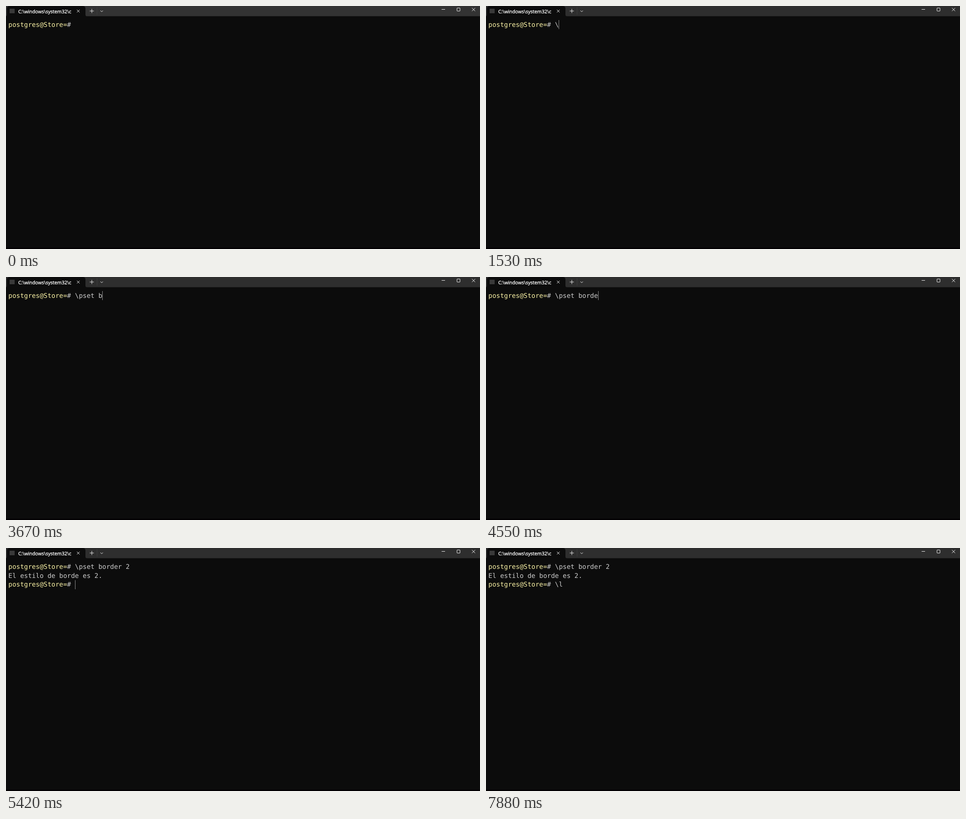
Write an HTML page that moves like this. It is 1044 by 536 pixels and loops after 8000 ms.

```html
<!DOCTYPE html>
<html lang="es">
<head>
<meta charset="utf-8">
<title>Terminal</title>
<style>
  html, body { margin: 0; width: 100%; height: 100%; overflow: hidden; background: #0c0c0c; }
  svg { display: block; width: 1044px; height: 536px; }
  text { white-space: pre; text-rendering: geometricPrecision; }
  .term { font: 14.32px "DejaVu Sans Mono", "Noto Sans Mono", monospace; fill: #ccc; }
  .user { fill: #f9f1a5; }
  .title { font: 10.6px "Open Sans", "Noto Sans", sans-serif; fill: #fff; stroke: #fff; stroke-width: .35; }
  .icon { fill: none; stroke: #f2f2f2; stroke-width: 1; }
</style>
</head>
<body>
<svg viewBox="0 0 1044 536">
  <rect width="1044" height="536" fill="#0c0c0c"/>
  <rect y="533" width="1044" height="3" fill="#030003"/>
  <rect id="bar" width="1044" height="22.5" fill="#333"/>
  <path d="M0 23Q2 22 2 19V6Q2 0 8 0H169Q175 0 175 6V19Q175 22 178 23Z" fill="#0c0c0c"/>
  <rect x="8" y="6" width="11" height="10" fill="#3a3a3a"/>
  <text class="title" x="27" y="16">C:\windows\system32\c</text>
  <path d="M200.5 3V19" stroke="#3e3e3e"/>
  <g class="icon">
    <path d="M156.2 8.2l6 6m0-6l-6 6"/>
    <path d="M184.5 11h9m-4.5-4.5v9"/>
    <path d="M208 10l2.8 2.8l2.8-2.8"/>
    <path d="M959.5 7.5h7.5"/>
    <rect x="993.3" y="4.3" width="6.7" height="6.9" rx=".8"/>
    <path d="M1026.3 4.3l7 7m0-7l-7 7"/>
  </g>
  <g class="term">
    <text x="5.3" y="46"><tspan class="user">postgres@Store=</tspan># <tspan id="cmd"></tspan></text>
    <g id="reply">
      <text x="5.3" y="66">El estilo de borde es 2.</text>
      <text x="5.3" y="85"><tspan class="user">postgres@Store=</tspan># <tspan id="next"></tspan></text>
    </g>
  </g>
  <rect id="caret" width="1" height="20" fill="#909090"/>
  <path id="mouse" d="M0 0V9.2L2.1 7.3L3.6 10.4L5 9.7L3.6 6.7H6.2Z"
        fill="#fff" stroke="#000" stroke-width=".5"/>
</svg>
<script>
const LOOP = 8000, CELL = 8.62, LEFT = 152.2;
const ENTER = 5420, FOCUS = 1400;

// time of each key press
const first = { text: "\\pset border 2", keys: [1530, 2740, 2870, 3070, 3340, 3470, 3670, 3730, 4000, 4400, 4550, 4750, 4890, 5090] };
const second = { text: "\\l", keys: [6540, 7270] };

// caret hidden between these times
const blinks = [[0, 610], [1130, FOCUS], [2210, 2740], [6080, 6280], [7880, LOOP]];

const sweep = { from: [962, 517], to: [650, 321.5], start: 190, step: 70, steps: 4, end: 1530 };

const el = id => document.getElementById(id);
const [bar, cmd, reply, next, caret, mouse] = ["bar", "cmd", "reply", "next", "caret", "mouse"].map(el);
const show = (node, on) => node.setAttribute("visibility", on ? "visible" : "hidden");
const typed = (line, t) => line.text.slice(0, line.keys.filter(k => k <= t).length);

function moveMouse(t) {
  const { from, to, start, step, steps, end } = sweep;
  show(mouse, t >= start && t < end);
  const p = Math.min(1, Math.max(0, Math.floor((t - start) / step) / steps));
  const ease = 1 - (1 - p) ** 2;
  const [x, y] = from.map((v, i) => v + (to[i] - v) * ease);
  mouse.setAttribute("transform", `translate(${x} ${y})`);
}

function draw(t) {
  const entered = t >= ENTER;
  const a = typed(first, t), b = typed(second, t);
  cmd.textContent = a;
  next.textContent = b;
  show(reply, entered);
  caret.setAttribute("x", Math.floor(LEFT + CELL * (entered ? b : a).length));
  caret.setAttribute("y", entered ? 71 : 31);
  show(caret, !blinks.some(([off, on]) => t >= off && t < on));
  bar.setAttribute("fill", t < FOCUS ? "#333" : "#2e2e2e");
  moveMouse(t);
}

const born = performance.now();
function tick() {
  draw((performance.now() - born) % LOOP);
  requestAnimationFrame(tick);
}
tick();
</script>
</body>
</html>
```
